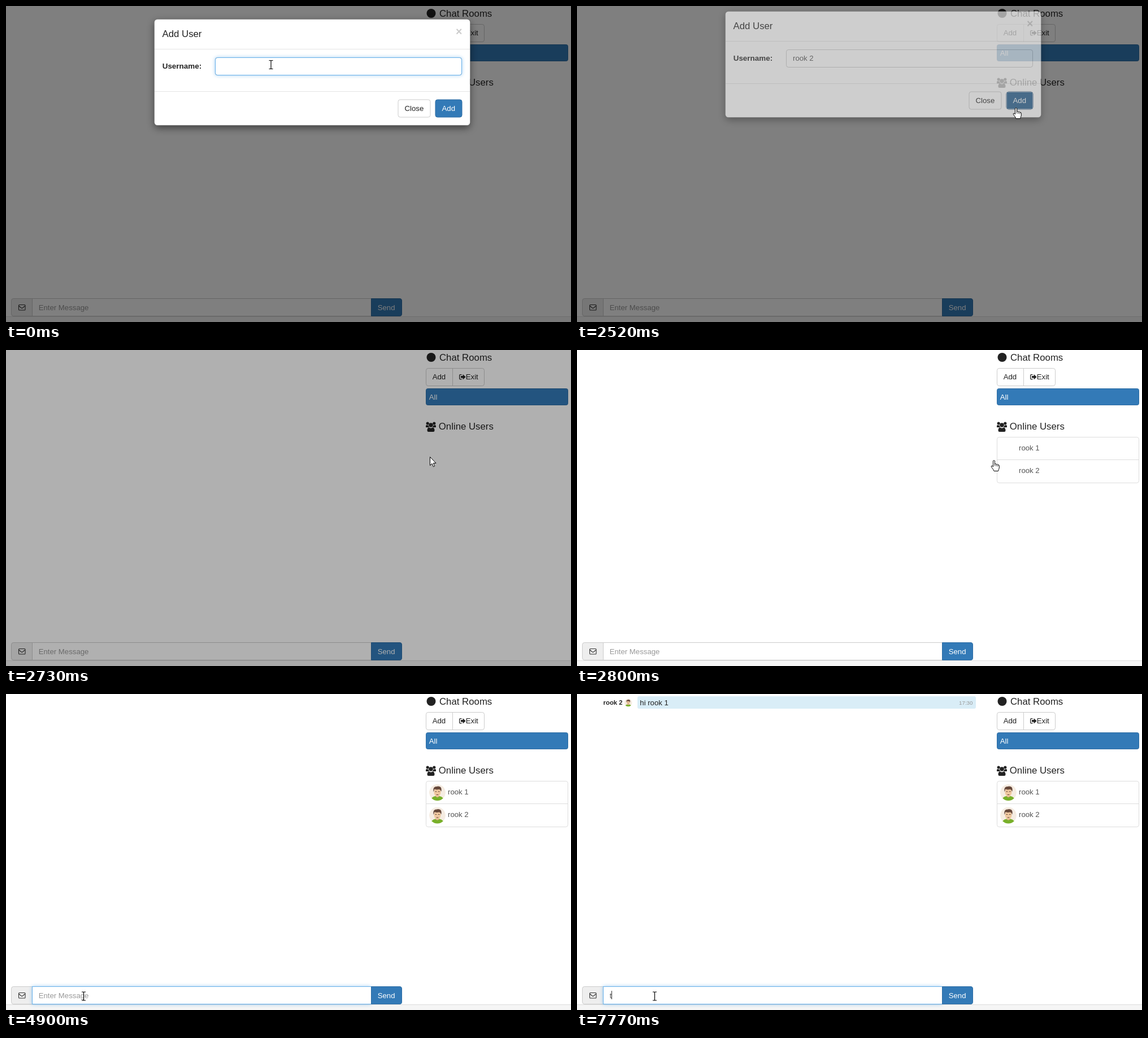
Animation of 1000x560 px, one loop 8000 ms. Source, as an HTML page:

```html
<!DOCTYPE html>
<html lang="en">
<head>
<meta charset="utf-8">
<title>Chat rooms</title>
<style>
  html, body { margin: 0; width: 100%; height: 100%; overflow: hidden; background: #fff; }
  svg { display: block; width: 1000px; height: 560px; }
  text { font: 13.2px Arial, "Liberation Sans", sans-serif; fill: #222; white-space: pre; }
  .head { font-size: 16.8px; }
  .label { font-size: 13.45px; font-weight: bold; }
  .typed { fill: #555; }
  .hint { fill: #999; }
  .light { fill: #fff; }
  .sender { font-size: 11.35px; font-weight: bold; }
  .time { font-size: 9.8px; fill: #999; }
  .close { font-size: 19.6px; font-weight: bold; fill: #ccc; }
  .box { fill: #fff; stroke: #ccc; }
  .blue { fill: #337ab7; stroke: #2e6da4; }
  .list { fill: none; stroke: #ddd; }
  .glow { fill: #66afe9; filter: url(#soft); }
  .ring { fill: none; stroke: #66afe9; }
  .ink { fill: #222; }
</style>
</head>
<body>
<svg viewBox="0 0 1000 560">
  <defs>
    <filter id="soft" x="-10%" y="-60%" width="120%" height="220%"><feGaussianBlur stdDeviation="3.4"/></filter>
    <filter id="shade" x="-10%" y="-30%" width="120%" height="160%"><feGaussianBlur stdDeviation="7"/></filter>
    <clipPath id="disc"><circle r="14.5"/></clipPath>
    <g id="avatar" clip-path="url(#disc)">
      <circle r="14.5" fill="#f5ece2"/>
      <path d="M-12 15Q-11 8 -4 6.5H4Q11 8 12 15Z" fill="#78b02a"/>
      <path d="M-3 3H3V7Q0 10.5 -3 7Z" fill="#e0b088"/>
      <ellipse cy="-.5" rx="6" ry="7.5" fill="#f0c8a0"/>
      <path d="M-6.8 -1Q-8.5 -10 -2 -10.5Q7.5 -12.5 7.2 -4L6.5 -1Q6 -5 3 -5.5Q-2 -4.5 -5 -6Z" fill="#66483a"/>
      <path d="M-4 -1.6H-1.3M1.3 -1.6H4M-1.8 4H1.8" stroke="#5a4034" fill="none"/>
    </g>
  </defs>

  <!-- page -->
  <rect width="1000" height="560" fill="#fff"/>
  <rect y="550" width="1000" height="10" fill="#f5f5f5"/>
  <path d="M0 550.5H1000" stroke="#ddd"/>

  <circle class="ink" cx="752.5" cy="13" r="8"/>
  <text class="head" x="767" y="19">Chat Rooms</text>
  <rect class="box" x="743.5" y="32.5" width="103" height="31" rx="3.7"/>
  <path d="M790.5 33V63" stroke="#ccc"/>
  <text x="754.7" y="52.3">Add</text>
  <path d="M806.5 43.7H804Q802.7 43.7 802.7 45V50.5Q802.7 51.8 804 51.8H806.5" fill="none" stroke="#222" stroke-width="1.3"/>
  <path class="ink" d="M805 46H808.6V43L813.6 47.8 808.6 52.5V49.6H805Z"/>
  <text x="813.8" y="52.3">Exit</text>
  <rect class="blue" x="743.5" y="68.5" width="251" height="29" rx="3"/>
  <text class="light" x="748.7" y="88">All</text>

  <g class="ink">
    <circle cx="746.2" cy="130" r="2.6"/><circle cx="757.8" cy="130" r="2.6"/>
    <path d="M743 137V135Q743 132.5 745 133L748 134Q748 136 749 137.2Z"/>
    <path d="M761 137V135Q761 132.5 759 133L756 134Q756 136 755 137.2Z"/>
    <circle cx="752" cy="133" r="3.8"/>
    <path d="M745.5 142.5Q745.5 137.5 749 137.3Q752 139.8 755 137.3Q758.5 137.5 758.5 142.5Q758.5 145 756 145H748Q745.5 145 745.5 142.5Z"/>
  </g>
  <text class="head" x="765.8" y="141.3">Online Users</text>
  <g id="people">
    <rect class="list" x="743.5" y="154.5" width="251" height="81" rx="3.7"/>
    <path class="list" d="M743.5 194.5H994.5"/>
    <text class="typed" x="782" y="178">rook 1</text>
    <text class="typed" x="782" y="218">rook 2</text>
    <g id="faces">
      <use href="#avatar" x="763.5" y="174.5"/>
      <use href="#avatar" x="763.5" y="215"/>
    </g>
  </g>

  <g id="message">
    <text class="sender" x="46.6" y="19">rook 2</text>
    <use href="#avatar" transform="translate(90.7 15.3) scale(.48)"/>
    <rect x="107" y="4" width="599" height="22" rx="3" fill="#d9edf7"/>
    <text x="111.3" y="19.7">hi rook 1</text>
    <text class="time" x="676" y="19">17:30</text>
  </g>

  <path d="M46.5 518.5H13.2Q9.5 518.5 9.5 522.2V545.8Q9.5 549.5 13.2 549.5H46.5Z" fill="#eee" stroke="#ccc"/>
  <rect x="22.5" y="529.5" width="11.5" height="9.5" rx="1.3" fill="none" stroke="#333" stroke-width="1.1"/>
  <path d="M22.8 531.5L27 535Q28.2 535.9 29.4 535L33.7 531.5" fill="none" stroke="#333" stroke-width="1.1"/>
  <rect class="glow chatFocus" x="46" y="518" width="600" height="32"/>
  <rect class="box" x="46.5" y="518.5" width="600" height="31"/>
  <rect class="ring chatFocus" x="46.5" y="518.5" width="600" height="31"/>
  <path class="blue" d="M646.5 518.5H697Q700.5 518.5 700.5 522V546Q700.5 549.5 697 549.5H646.5Z"/>
  <text class="light" x="657.7" y="538.5">Send</text>
  <text class="hint" id="hint" x="57.7" y="538.5">Enter Message</text>
  <text class="typed" id="chatText" x="57.7" y="538.5"></text>

  <rect id="backdrop" width="1000" height="560"/>

  <!-- dialog -->
  <g id="dialog">
    <rect x="263" y="28" width="558" height="188" rx="5" opacity=".5" filter="url(#shade)"/>
    <rect x="262.5" y="23.5" width="559" height="188" rx="5.5" fill="#fff" stroke="#000" stroke-opacity=".2"/>
    <path d="M263 76.5H821M263 151.5H821" stroke="#e5e5e5"/>
    <text class="head" x="276.5" y="55">Add User</text>
    <text class="close" x="796" y="52">×</text>
    <text class="label" x="276.7" y="111.3">Username:</text>
    <rect class="glow nameFocus" x="370" y="91" width="437" height="32" rx="4" />
    <rect class="box" x="370.5" y="91.5" width="436" height="31" rx="3.7"/>
    <rect class="ring nameFocus" x="370.5" y="91.5" width="436" height="31" rx="3.7"/>
    <text class="typed" id="nameText" x="382" y="111.3"></text>
    <rect class="box" id="closeBtn" x="694" y="166" width="57" height="31" rx="3.7"/>
    <text x="705.5" y="186">Close</text>
    <rect class="blue" id="addBtn" x="760" y="166" width="47" height="31" rx="3.7"/>
    <rect id="dots" x="760.5" y="166.5" width="46" height="30" fill="none" stroke="#fff" stroke-dasharray="1 1"/>
    <text class="light" x="771.5" y="186">Add</text>
  </g>

  <rect id="caret" width="1" height="15" fill="#333"/>

  <g id="pointer">
    <path id="beam" d="M-3.5 -7.5H-1Q0 -7.5 0 -6.5Q0 -7.5 1 -7.5H3.5M0 -6.5V6.5M-3.5 7.5H-1Q0 7.5 0 6.5Q0 7.5 1 7.5H3.5" fill="none" stroke="#000" stroke-width="1.2"/>
    <path id="arrow" d="M.5 .5V15.5L4 12.3 6.4 17.8 8.7 16.8 6.4 11.5H11Z" fill="#fff" stroke="#000"/>
    <g id="hand" stroke="#000">
      <path d="M-1.5 1.5Q0 -.5 1.5 1.5V7Q3.5 5.8 4.2 7.6Q6 6.6 6.8 8.4Q9 7.8 9.3 10V14Q8.5 16.5 7.5 19.5H0Q-1 16.5 -4.5 12.5Q-5.5 10 -3.5 10L-1.5 12Z" fill="#fff"/>
      <path d="M1.5 7V10.5M4.2 7.6V11M6.8 8.4V11.5" fill="none" stroke-width=".8"/>
    </g>
  </g>
</svg>
<script>
const LOOP = 8000, STEP = 70;
const $ = id => document.getElementById(id);

const nameTyping = [[0, ""], [420, "r"], [560, "ro"], [630, "roo"], [770, "rook "], [1050, "rook 2"]];
const chatTyping = [[0, ""], [5110, "h"], [5390, "hi"], [5530, "hi "], [6370, "hi r"], [6440, "hi ro"],
  [6510, "hi roo"], [6580, "hi rook "], [6790, "hi rook 1"], [7210, ""], [7770, "t"]];
const caretOn = [[350, 1540], [2100, 2240], [4410, 4900], [5110, 5950], [6370, 7630], [7770, LOOP]];

// time, x, y, pointer shape
const path = [
  [0, 469, 104, "beam"], [1330, 469, 104, "beam"], [1400, 500, 112, "beam"], [1470, 600, 138, "arrow"],
  [1540, 692, 162, "arrow"], [1610, 692, 162, "arrow"], [1680, 725, 170, "hand"], [1750, 753, 172, "arrow"],
  [1820, 767, 173, "hand"], [2100, 777, 180, "hand"], [2520, 777, 180, "hand"], [2590, 772, 183, "arrow"],
  [2730, 750, 189, "arrow"], [2800, 738, 195, "hand"], [2870, 650, 222, "arrow"], [2940, 544, 250, "arrow"],
  [3010, 544, 250, "arrow"], [3080, 505, 284, "arrow"], [3220, 366, 378, "arrow"], [3290, 366, 378, "arrow"],
  [3360, 352, 398, "arrow"], [3570, 190, 510, "arrow"], [3710, 125, 549, "arrow"], [3920, 125, 549, "arrow"],
  [3990, 129, 546, "beam"], [4200, 137.5, 535.5, "beam"], [LOOP, 137.5, 535.5, "beam"]
];

const clamp = v => Math.max(0, Math.min(1, v));
const ramp = (t, from, span) => clamp((t - from) / span);
const latest = (list, t) => list.filter(k => k[0] <= t).pop();
const show = (el, on) => el.setAttribute("visibility", on ? "inherit" : "hidden");

function setFocus(cls, amount) {
  document.querySelectorAll("." + cls).forEach(el =>
    el.setAttribute("opacity", amount * (el.classList.contains("glow") ? .6 : 1)));
}

function movePointer(t) {
  const a = latest(path, t), b = path[path.indexOf(a) + 1];
  const u = (t - a[0]) / (b[0] - a[0]);
  const at = i => a[i] + (b[i] - a[i]) * u;
  $("pointer").setAttribute("transform", `translate(${at(1)} ${at(2)})`);
  for (const shape of ["beam", "arrow", "hand"]) show($(shape), shape === a[3]);
}

function draw(t) {
  const name = $("nameText"), chat = $("chatText");
  name.textContent = latest(nameTyping, t)[1];
  chat.textContent = latest(chatTyping, t)[1];
  show($("hint"), !chat.textContent);

  const inDialog = t < 2520, field = inDialog ? name : chat;
  const end = field.textContent ? field.getComputedTextLength() : 0;
  $("caret").setAttribute("x", Math.round(+field.getAttribute("x") + end));
  $("caret").setAttribute("y", inDialog ? 99 : 526);
  show($("caret"), caretOn.some(([from, to]) => t >= from && t < to));

  setFocus("nameFocus", 1 - ramp(t, 2200, 150));
  setFocus("chatFocus", ramp(t, 4370, 150));

  const over = t >= 1820 && t < 2590;
  $("addBtn").style.fill = over ? "#286090" : "";
  $("addBtn").style.stroke = over ? "#204d74" : "";
  $("closeBtn").style.fill = t === 1680 ? "#e6e6e6" : "";
  show($("dots"), t >= 2240);

  const lift = 47 * (1 - (1 - ramp(t, 2463, 300)) ** 1.7);
  $("dialog").setAttribute("transform", `translate(0 ${-Math.round(lift)})`);
  $("dialog").setAttribute("opacity", 1 - ramp(t, 2463, 150));
  $("backdrop").setAttribute("opacity", t < 2730 ? .5 : t < 2800 ? .31 : 0);

  show($("people"), t >= 2800);
  show($("faces"), t >= 2870);
  show($("message"), t >= 7210);
  movePointer(t);
}

function tick() {
  const t = performance.now() % LOOP;
  draw(Math.floor(t / STEP) * STEP);
  requestAnimationFrame(tick);
}
tick();
</script>
</body>
</html>
```
